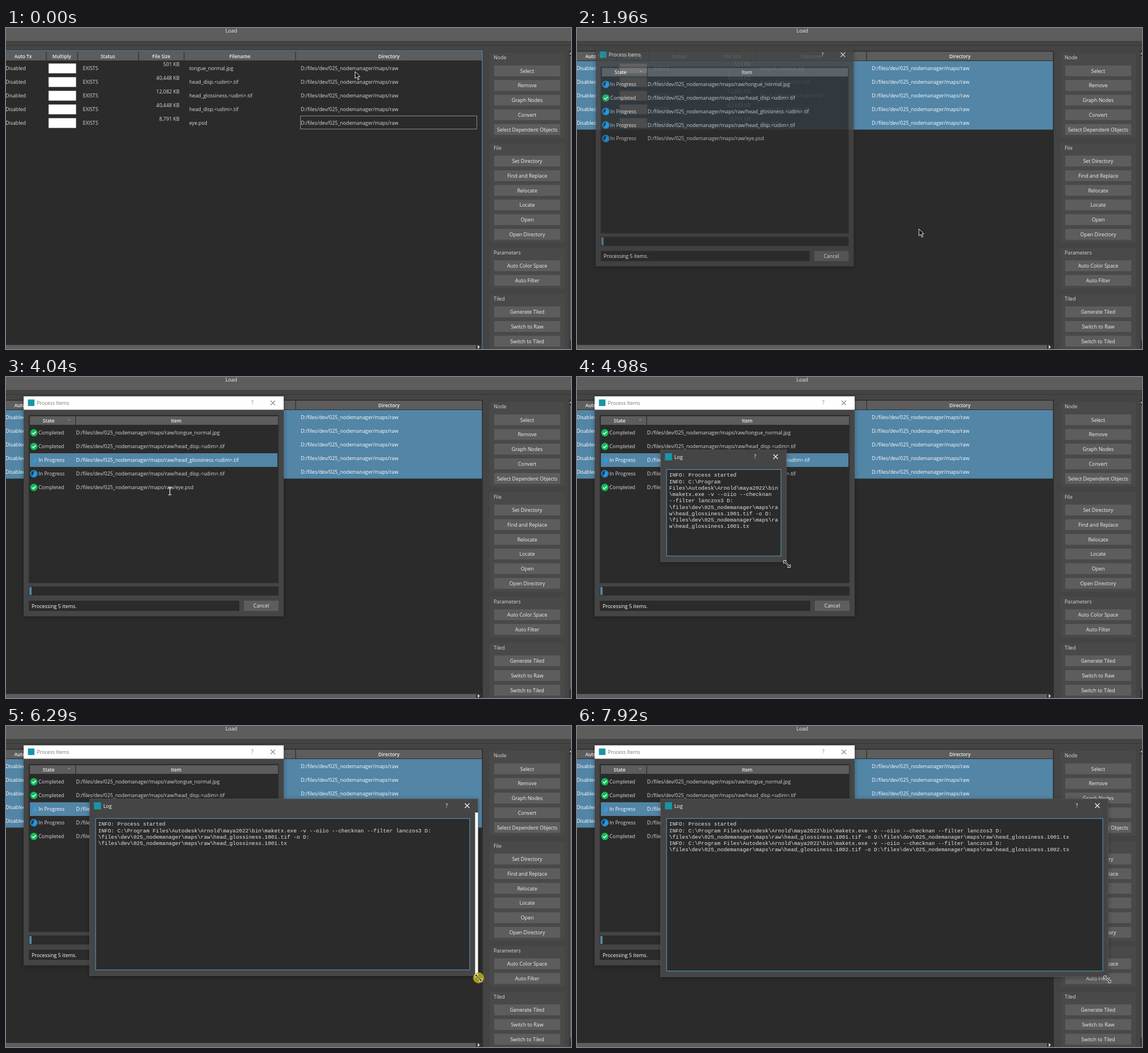
An HTML page for the animation above (8000 ms loop, 993x564 px).

```html
<!DOCTYPE html>
<html lang="en">
<head>
<meta charset="utf-8">
<title>Node manager</title>
<style>
html, body { margin: 0; width: 100%; height: 100%; overflow: hidden; background: #444; }
svg { display: block; width: 993px; height: 564px; font: 8.85px "Open Sans", "Noto Sans", sans-serif; }
text { fill: #dadada; white-space: pre; }
.head { font-size: 8.4px; font-weight: 600; fill: #f2f2f2; }
.btn { fill: #f2f2f2; }
.row.on text, .title, .bright { fill: #fff; }
.row.on .busy circle { fill: none; stroke: none; }
.log { font: 9.38px "Liberation Mono", monospace; }
.log text { fill: #e6e6e6; }
</style>
</head>
<body>
<svg id="stage" viewBox="0 0 993 564"></svg>
<script>
const BLUE = '#5285a6', DARK = '#2b2b2b', GREY = '#5d5d5d';
const PATH = 'D:/files/dev/025_nodemanager/maps/raw';
const LOOP = 8000;

const esc = s => s.replace(/&/g, '&amp;').replace(/</g, '&lt;');
const rect = (x, y, r, b, fill, more = '') =>
  `<rect x="${x}" y="${y}" width="${r - x}" height="${b - y}" fill="${fill}" ${more}/>`;
const text = (x, mid, s, cls = '', anchor = 'start') =>
  `<text x="${x}" y="${mid + 3.2}" class="${cls}" text-anchor="${anchor}">${esc(s)}</text>`;
const button = (x, y, r, b, label, more = '') =>
  rect(x, y, r, b, GREY, `rx="1" ${more}`) + text((x + r) / 2, (y + b) / 2, label, 'btn', 'middle');
const cross = (x, y, more = '') =>
  `<path d="M${x - 4} ${y - 4}l8 8m0-8l-8 8" fill="none" stroke-width="1.1" ${more}/>`;

const files = [
  ['501 KB', 'tongue_normal.jpg'],
  ['40,448 KB', 'head_disp.<udim>.tif'],
  ['12,082 KB', 'head_glossiness.<udim>.tif'],
  ['40,448 KB', 'head_disp.<udim>.tif'],
  ['8,791 KB', 'eye.psd']
];

function mainTable() {
  const heads = [['Auto Tx', 30], ['Multiply', 98], ['Status', 179], ['File Size', 273], ['Filename', 411], ['Directory', 673]];
  const rows = files.map(([size, name], i) => {
    const y = 71 + i * 24;
    return `<g class="row main">${text(-1, y, 'Disabled')}
      ${rect(75, y - 8.5, 123, y + 8.5, '#fff', 'stroke="#b5b5b5" stroke-width=".6"')}
      ${text(135, y, 'EXISTS')}${text(305, y - 7, size, '', 'end')}
      ${text(322, y, name)}${text(518, y, PATH)}</g>`;
  }).join('');
  return rect(0, 40, 838, 564, DARK) +
    rect(0, 41.5, 836.5, 57, GREY) +
    [71, 126, 233, 313, 509].map(x => rect(x - .5, 41.5, x + .5, 57, '#222')).join('') +
    heads.map(([s, x]) => text(x, 49.5, s, 'head', 'middle')).join('') +
    rect(0, 58, 836.5, 58, BLUE, 'id="selection"') + rows +
    rect(517.5, 154.5, 827.5, 177.5, 'none', 'id="cell" stroke="#8a8a8a"') +
    rect(0, 556, 836, 564, '#333') + rect(0, 557, 826, 564, GREY) +
    '<path d="M829 557l4 3.5l-4 3.5z" fill="#ccc"/>' +
    `<path id="focus" d="M0 40.5H837V564" fill="none" stroke="${BLUE}" stroke-width="1.4"/>`;
}

function sidePanel() {
  const groups = [
    ['Node', 52, ['Select', 'Remove', 'Graph Nodes', 'Convert', 'Select Dependent Objects']],
    ['File', 210.5, ['Set Directory', 'Find and Replace', 'Relocate', 'Locate', 'Open', 'Open Directory']],
    ['Parameters', 394.5, ['Auto Color Space', 'Auto Filter']],
    ['Tiled', 475.5, ['Generate Tiled', 'Switch to Raw', 'Switch to Tiled']]
  ];
  return groups.map(([name, y, labels]) =>
    rect(850, y - 8, 982, y + 12 + labels.length * 25.75, '#494949', 'rx="2"') + text(857, y, name) +
    labels.map((label, i) => {
      const mid = y + 23.3 + i * 25.75;
      return button(858, mid - 9.5, 974, mid + 9.5, label, label === 'Generate Tiled' ? 'id="generate"' : '');
    }).join('')).join('') +
    rect(989.5, 39, 993, 564, '#373737') + rect(991, 50, 993, 548, GREY) +
    '<path d="M990 46l3-3v3z" fill="#ccc"/>';
}

const busyIcon = y => `<g class="busy" transform="translate(49 ${y})">
  <circle r="5.7" fill="#23384a" stroke="#21a0ee" stroke-width="1.5"/><path d="M0 0V-4.6A4.6 4.6 0 1 1 -3.2 3.2Z" fill="#21a0ee"/></g>`;
const doneIcon = y => `<g class="done" transform="translate(49 ${y})">
  <circle r="6.4" fill="#10bd58"/><path d="M-3 .2L-.8 2.4L3.3-2" fill="none" stroke="#fff" stroke-width="1.6"/></g>`;

function processWindow() {
  const rows = files.map(([, name], i) => {
    const y = 98 + i * 24;
    return `<g class="row item">${busyIcon(y)}${doneIcon(y)}
      <text class="state" x="57" y="${y + 3.2}"></text>${text(123, y, PATH + '/' + name)}</g>`;
  }).join('');
  return `<g id="process">${rect(31, 34, 488, 420.5, '#444', 'filter="url(#shadow)"')}
    ${rect(31, 34, 488, 57.5, '#fff', 'id="bar"')}${rect(38.5, 39.5, 50, 51, '#1796a8')}
    <g id="caption">${text(54, 45.5, 'Process Items')}${text(433, 45, '?', '', 'middle')}${cross(469, 45.5)}</g>
    ${rect(40, 67, 479, 362, DARK, 'stroke="#383838"')}${rect(42, 69, 478, 84, GREY)}
    ${rect(122, 69, 123, 84, '#222')}${text(75, 77, 'State', 'head', 'middle')}${text(299, 77, 'Item', 'head', 'middle')}
    <path d="M108.5 74h5l-2.5 3z" fill="#888"/>
    ${rect(42, 134, 477, 158, BLUE, 'id="picked"')}${rows}
    ${rect(40, 368, 479, 384, DARK)}${rect(41, 369, 45, 383, BLUE)}
    ${rect(40, 393, 410, 411, DARK)}${text(45, 402.5, 'Processing 5 items.', 'bright')}
    ${button(418, 393, 479, 411, 'Cancel')}</g>`;
}

const logWindow = () => `<g id="logWin"><rect id="logBody" x="147" y="128" fill="#444" stroke="#5a5a5a" stroke-width=".7" filter="url(#shadow)"/>
  <rect id="gap" y="152" fill="#fff"/>
  ${rect(154.5, 134, 167, 146.5, '#1796a8')}${text(171, 140.5, 'Log', 'title')}
  <g id="logButtons">${text(-55, 140, '?', 'title', 'middle')}${cross(-19, 140, 'stroke="#fff"')}</g>
  <rect id="logBox" x="157.5" y="162.5" fill="${DARK}" stroke="${BLUE}" stroke-width="1.3"/>
  <g id="logText" class="log"></g></g>`;

const pointer = `<g id="pointer"><circle id="press" r="9.7" fill="#c6b80f" opacity=".8"/>
  <path id="arrow" d="M0 0V12.2L2.9 9.6L5 14.6L7 13.7L4.9 8.9H8.6Z" fill="#111" stroke="#fff" stroke-width=".9"/>
  <path id="beam" d="M-3-6.5H-.8L0-6L.8-6.5H3M0-6V6M-3 6.5H-.8L0 6L.8 6.5H3" fill="none" stroke="#eee" stroke-width="1.2"/>
  <path id="resize" d="M-6-6H-1L-2.8-4.2L4.2 2.8L6 1V6H1L2.8 4.2L-4.2-2.8L-6-1Z" fill="#222" stroke="#fff" stroke-width=".9"/></g>`;

document.getElementById('stage').innerHTML =
  `<filter id="shadow" x="-10%" y="-10%" width="120%" height="125%"><feDropShadow dx="0" dy="2" stdDeviation="4" flood-opacity=".3"/></filter>` +
  rect(0, 0, 993, 564, '#444') + rect(0, 0, 993, 23, GREY) + rect(0, 23, 993, 24, '#3a3a3a') +
  text(396, 5, 'Load', 'btn', 'middle') + rect(0, 30, 993, 31, '#353535') +
  mainTable() + sidePanel() + processWindow() + logWindow() + pointer;

const $ = id => document.getElementById(id);
const set = (id, attrs) => { for (const k in attrs) $(id).setAttribute(k, attrs[k]); };
const show = (el, on) => { el.style.display = on ? '' : 'none'; };

// Pointer moves: first step, last step, number of steps, end x, end y
const moves = [
  [60, 60, 1, 620, 70], [230, 230, 1, 624, 60], [310, 610, 5, 632, 171],
  [850, 1170, 5, 874.5, 458.5], [1250, 1640, 6, 905, 495], [1730, 1960, 4, 601, 353],
  [2360, 2890, 8, 360, 145], [3040, 3120, 2, 361, 147], [3430, 3890, 7, 288, 199],
  [4040, 4040, 1, 288, 200.5], [4120, 4820, 10, 367, 327], [4900, 4980, 2, 369, 328.5],
  [5200, 5670, 7, 633, 409.5], [5750, 5980, 4, 737, 418],
  [6060, 6290, 4, 830.5, 442.5], [6370, 6520, 3, 882, 443],
  [6840, 6920, 2, 896, 435], [7070, 7220, 3, 937, 439],
  [7620, 7620, 1, 940, 444], [7690, 7840, 2, 934.5, 444.5], [7920, 7920, 1, 932, 445]
];

function pointerAt(t) {
  let x = 613.5, y = 76.5;
  for (const [from, to, n, endX, endY] of moves) {
    if (t < from) break;
    const gap = Math.max(1, (to - from) / (n - 1 || 1));
    const p = n === 1 ? 1 : Math.min(1, (Math.floor((t - from) / gap + .05) + 1) / n);
    x += (endX - x) * p;
    y += (endY - y) * p;
  }
  return [x, y];
}

function fade(t, start) {
  const step = Math.floor((t - start) / 77 + .05);
  return step < 0 ? 0 : [.12, .36, .62, .84][step] ?? 1;
}

const command = id => {
  const base = `D:\\files\\dev\\025_nodemanager\\maps\\raw\\head_glossiness.${id}`;
  return `INFO: C:\\Program Files\\Autodesk\\Arnold\\maya2022\\bin\\maketx.exe -v --oiio --checknan --filter lanczos3 ${base}.tif -o ${base}.tx`;
};

function wrap(line, cols) {
  const out = [''];
  for (let part of line.split(/(?<= )|(?<=-)(?=[a-z])|(?<=:)(?=\\)|(?<=\.)(?=\d)/)) {
    const last = out.length - 1;
    if ((out[last] + part).trimEnd().length <= cols) { out[last] += part; continue; }
    while (part.length > cols) { out.push(part.slice(0, cols)); part = part.slice(cols); }
    out.push(part);
  }
  return out;
}

function drawLog(t) {
  const opacity = fade(t, 4120);
  show($('logWin'), opacity > 0);
  if (!opacity) return;
  const [x, y] = pointerAt(Math.min(7860, Math.max(5100, t)));
  const right = x - 1, bottom = y - 4;
  const lag = t >= 6200 && t < 6400 ? 5 : 0;
  const inner = right - lag - 9.5;
  set('logWin', { opacity });
  set('logBody', { width: right - 147, height: bottom - 128 });
  set('gap', { x: right - lag, width: lag, height: bottom - 152 });
  set('logButtons', { transform: `translate(${right} 0)` });
  set('logBox', { width: inner - 157.5, height: bottom - 10 - 162.5 });
  const cols = Math.floor((inner - 4 - 162) / 5.628);
  const lines = ['INFO: Process started', command(1001)];
  if (t >= 6840) lines.push(command(1002));
  $('logText').innerHTML = lines.flatMap(s => wrap(s, cols))
    .map((s, i) => text(162, 172.2 + i * 11.25, s)).join('');
}

function drawProcess(t) {
  const opacity = fade(t, 1730), scale = 1 - (1 - opacity) * .05;
  show($('process'), opacity > 0);
  set('process', { opacity, transform: `translate(259.5 227) scale(${scale}) translate(-259.5 -227)` });
  const active = t < 4040;
  set('bar', { fill: active ? '#444' : '#fff' });
  set('caption', { stroke: active ? '#fff' : '#888' });
  $('caption').querySelectorAll('text').forEach(el => {
    el.style.fill = active ? '#fff' : '#777';
    el.style.stroke = 'none';
  });
  show($('picked'), t >= 3040);
  const doneAt = [3510, 0, LOOP, LOOP, 2590];
  document.querySelectorAll('.item').forEach((row, i) => {
    const done = t >= doneAt[i];
    show(row.querySelector('.busy'), !done);
    show(row.querySelector('.done'), done);
    row.querySelector('.state').textContent = done ? 'Completed' : 'In Progress';
    row.classList.toggle('on', i === 2 && t >= 3040);
  });
}

function draw(t) {
  const [x, y] = pointerAt(t);
  const selected = t < 230 ? 0 : t >= 610 ? 5 : Math.min(5, Math.floor((y - 58) / 24) + 1);
  set('selection', { height: selected * 24.1 });
  document.querySelectorAll('.main').forEach((row, i) => row.classList.toggle('on', i < selected));
  set('cell', { opacity: selected < 5 ? 1 : t < 1560 ? .18 : 0 });
  show($('focus'), t < 1560);
  set('generate', { fill: t >= 1480 && t < 1730 ? '#707070' : GREY });
  drawProcess(t);
  drawLog(t);

  const within = (from, to) => t >= from && t < to;
  set('pointer', { transform: `translate(${x} ${y})` });
  show($('press'), within(230, 680) || within(1560, 1730) || within(3040, 3120) || within(5200, 7900));
  show($('arrow'), t < 4040);
  show($('beam'), within(4040, 4740));
  show($('resize'), t >= 4740);
}

const start = performance.now();
function frame() {
  draw((performance.now() - start) % LOOP);
  requestAnimationFrame(frame);
}
frame();
</script>
</body>
</html>
```
